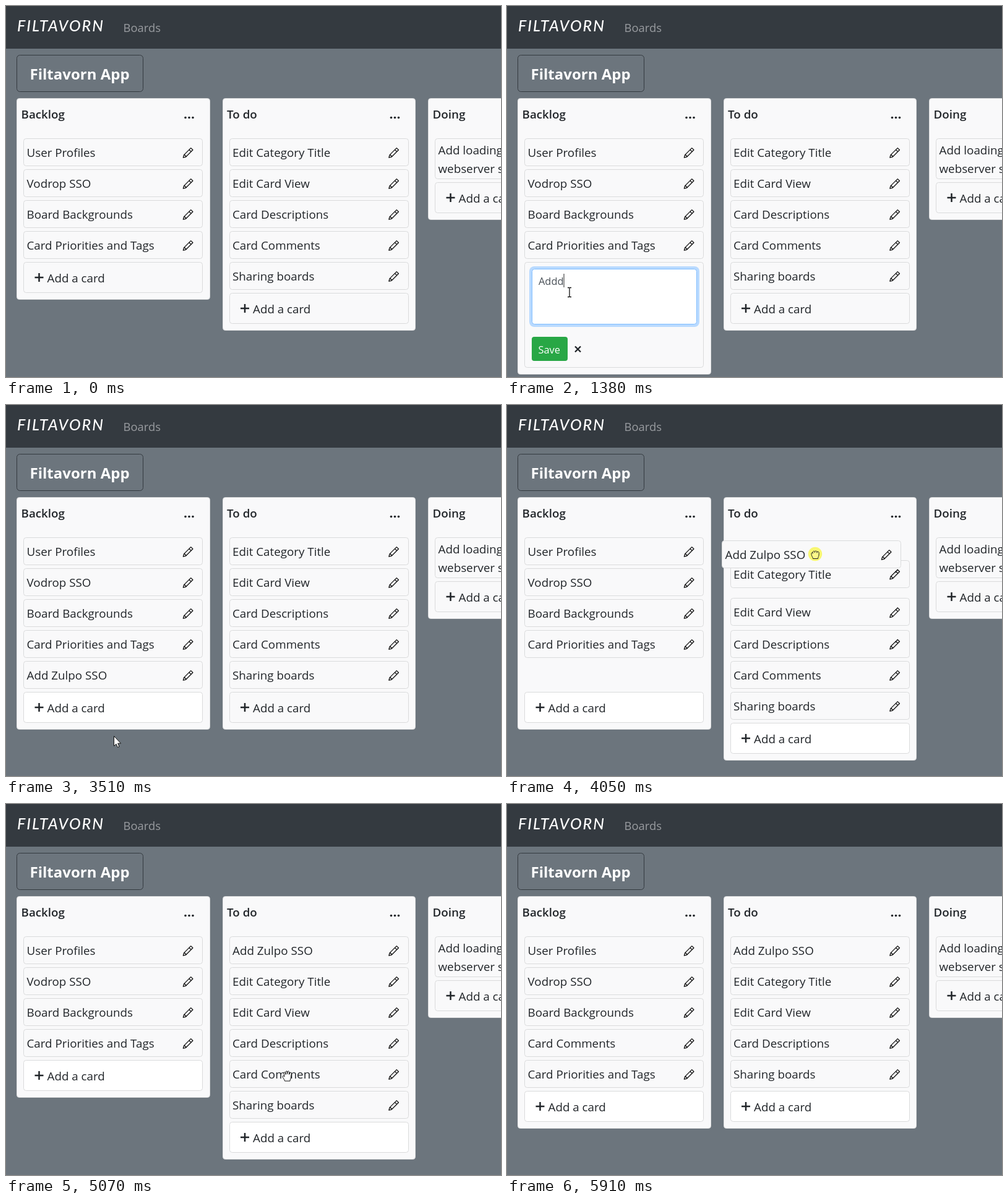
An HTML page for the animation above (6.03 s loop, 800 by 600 pixels).

```html
<!DOCTYPE html>
<html lang="en">
<head>
<meta charset="utf-8">
<title>Task board</title>
<style>
  html, body { margin: 0; width: 100%; height: 100%; overflow: hidden; background: #6c757d; }
  svg { display: block; width: 800px; height: 600px; }
  text { font-family: "Open Sans", "Noto Sans", sans-serif; font-size: 18.8px; fill: #212529; }
  .logo { font: italic 500 25px Lato, sans-serif; letter-spacing: 2px; fill: #fff; }
  .nav { font-size: 18.4px; fill: #999ca0; }
  .board { font-size: 24px; font-weight: 700; fill: #fff; }
  .title { font-weight: 600; }
  .field { font-size: 16.4px; fill: #495057; }
  .hint { fill: #6c757d; }
  .save { fill: #fff; }
</style>
</head>
<body>
<svg viewBox="0 0 800 600">
  <defs>
    <g id="pencil" fill="none" stroke="#111" stroke-width="1.1" stroke-linejoin="round">
      <path transform="translate(-9.4 -9.4) scale(1.18)" d="M12 1.3 14.7 4 5.2 13.5 1.5 14.5 2.5 10.8Z M9.6 3.7 12.3 6.4 M2.7 10.9 4 11 4.2 11.8 5 12 5.2 13.2"/>
    </g>
    <path id="plus" d="M-7 0H7M0-7V7" stroke="#212529" stroke-width="2.5"/>
    <path id="arrow" d="M.5.5V16.5L4.1 13.2 6.5 18.6 9 17.5 6.7 12.2H11.6Z" fill="#fff" stroke="#111"/>
    <g id="ibeam" fill="none">
      <path d="M-3-7.5H-1L0-7 1-7.5H3M0-7V7M-3 7.5H-1L0 7 1 7.5H3" stroke="#111" stroke-width="1.3"/>
    </g>
    <path id="hand" fill="#fff" stroke="#111" stroke-linejoin="round" d="M-4.5 8C-5 5-8 3-8 .5C-7.5-1-6-.5-5 1L-6-5C-5.5-7-4-6.5-3.6-5L-3-2.5-2.8-7C-2-8.8-.6-8.3-.5-7V-3L.4-7.5C1.2-8.8 2.6-8 2.6-6.6L2.5-2.5 4-5.5C5.3-6.6 6.6-5.5 6.2-4L5.5 2C5.2 4.5 4 5.5 4 8Z"/>
    <g id="fist" fill="#fbf98a" stroke="#222" stroke-linejoin="round">
      <path d="M-6-.5C-6.5-2.8-5-3.6-3.8-3.4C-3.8-5.8-1.6-6.3-.6-5C.4-6.4 2.4-6 2.8-4.5C4.4-5.6 6.4-4.6 6.2-2.6L6 1C5.8 3 4.6 4 4.5 6.5H-3.5C-3.6 4-6 2.4-6-.5Z"/>
      <path d="M-3.8-3.4V-1.6M-.6-5V-3M2.8-4.5V-2.6" fill="none"/>
    </g>
  </defs>
  <rect width="800" height="600" fill="#6c757d"/>
  <rect width="800" height="69" fill="#343a40"/>
  <text class="logo" x="18" y="41">FILTAVORN</text>
  <text class="nav" x="189.5" y="42">Boards</text>
  <rect x="17.5" y="79.5" width="204" height="59" rx="5" fill="none" stroke="#343a40"/>
  <text class="board" x="38.5" y="119">Filtavorn App</text>
  <g id="scene"></g>
</svg>
<script>
const LOOP = 6030, TICK = 30, ROW = 50, TOP = 214;
const COLS = [28, 360.5, 693];
const PAPER = '#f9f9fa', EDGE = '#dadbdc';
const NEW_CARD = 'Add Zulpo SSO';
const EDITOR = { open: 750, close: 3210, added: 2700 };
const scene = document.getElementById('scene');
const pen = document.createElement('canvas').getContext('2d');

const clamp = v => Math.max(0, Math.min(1, v));
const mix = (a, b, p) => a + (b - a) * p;
const within = (t, from, to) => t >= from && t < to;
const settle = p => 1 - (1 - clamp(p)) ** 3.7;
const slotY = slot => TOP + slot * ROW;
const shift = (t, start) => ROW * settle((t - start) / 200);

const PATH = [
  [210, 552, 596], [690, 101, 446], [750, 101, 446], [930, 101, 463],
  [2670, 101, 463], [2700, 99, 462], [2910, 99, 462], [3150, 114, 594], [3210, 114, 594],
  [3510, 174, 535], [3660, 179, 437], [3690, 179, 437], [3930, 462, 335],
  [4050, 498, 242], [4110, 505, 229], [4350, 505, 229], [5010, 455, 440],
  [5100, 455, 440], [5430, 123, 388], [5550, 123, 388], [5670, 268, 422], [5910, 735, 604]
];

function cursorAt(t) {
  const i = PATH.findIndex(k => k[0] > t);
  if (i < 1) return PATH[i < 0 ? PATH.length - 1 : 0].slice(1);
  const [a, b] = [PATH[i - 1], PATH[i]];
  const p = (t - a[0]) / (b[0] - a[0]);
  const eased = mix(p, p * p * (3 - 2 * p), .6);
  return [mix(a[1], b[1], eased), mix(a[2], b[2], eased)];
}

const DRAGS = {
  fresh: { grab: 3690, drop: 4260, from: [COLS[0], slotY(4)], to: [COLS[1], slotY(0)] },
  comments: { grab: 5100, drop: 5520, from: [COLS[1], slotY(4)], to: [COLS[0], slotY(3)] }
};

function dragPosition(t, { grab, drop, from, to }) {
  if (t < grab) return from;
  const start = cursorAt(grab), now = cursorAt(Math.min(t, drop));
  const p = settle((t - drop) / 240);
  return from.map((v, i) => mix(v + now[i] - start[i], to[i], p));
}

// Box edges snap to whole pixels, as in page layout.
function box(x, y, w, h, fill = PAPER, stroke = EDGE) {
  const [left, top, right, bottom] = [x, y, x + w, y + h].map(Math.round);
  return `<rect x="${left + .5}" y="${top + .5}" width="${right - left - 1}" height="${bottom - top - 1}" rx="4" fill="${fill}" stroke="${stroke}"/>`;
}
const label = (x, y, text, cls = '') => `<text class="${cls}" x="${x}" y="${y}">${text}</text>`;
const use = (id, x, y) => `<use href="#${id}" x="${x}" y="${y}"/>`;

const card = (x, y, text) =>
  box(x, y, 290, 45) + label(x + 5.5, y + 30, text) + use('pencil', x + 266, y + 23.5);

const addButton = (x, y, fill) =>
  box(x, y, 290, 50, fill) + use('plus', x + 25.5, y + 25) + label(x + 38.5, y + 33, 'Add a card');

function column(x, title, bottom) {
  const dots = [262, 268, 274].map(d => `<circle cx="${x + d}" cy="180.5" r="1.8" fill="#212529"/>`);
  return box(x - 11, 149, 312.5, bottom - 149) + label(x - 3.5, 182, title, 'title') + dots.join('');
}

function typedText(t) {
  if (t < 1080 || t >= 2490) return '';
  if (t < 1590) return 'Addd'.slice(0, [1080, 1170, 1260, 1380].filter(k => t >= k).length);
  const count = t < 2250 ? 3 + Math.floor((t - 1590) / 75) : t < 2310 ? 12 : 13;
  return NEW_CARD.slice(0, count);
}

function editor(x, y, t) {
  const text = typedText(t);
  pen.font = '16.4px "Open Sans", "Noto Sans", sans-serif';
  const caret = x + 23.5 + pen.measureText(text).width;
  return box(x, y, 290, 171) +
    `<rect x="${x + 8}" y="${y + 7}" width="275" height="98" rx="8" fill="#b9daff"/>` +
    box(x + 12, y + 11, 267, 90, '#fff', '#80bdff') +
    (text
      ? label(x + 23, y + 37, text, 'field') +
        `<path d="M${caret} ${y + 19}v22" stroke="#222"/>`
      : label(x + 23, y + 37, 'Enter card title...', 'field hint')) +
    `<rect x="${x + 12}" y="${y + 121}" width="58" height="39" rx="4" fill="#28a745"/>` +
    label(x + 22.5, y + 148, 'Save', 'field save') +
    `<path d="M${x + 82} ${y + 136.5}l9 9m0-9l-9 9" stroke="#212529" stroke-width="2.3"/>`;
}

function backlog(t) {
  const x = COLS[0];
  const slot = t < EDITOR.added ? 4 : t < 4500 ? 5 : t < 5250 ? 4 : 5;
  const y = slotY(slot), editing = within(t, EDITOR.open, EDITOR.close);
  return column(x, 'Backlog', y + (editing ? 182 : 61)) +
    ['User Profiles', 'Vodrop SSO', 'Board Backgrounds'].map((s, i) => card(x, slotY(i), s)).join('') +
    card(x, slotY(3) + shift(t, 5310), 'Card Priorities and Tags') +
    (editing ? editor(x, y, t) : addButton(x, y, t >= EDITOR.close ? '#fff' : PAPER));
}

function todo(t) {
  const x = COLS[1];
  const y = slotY(within(t, 3840, 5730) ? 6 : 5);
  return column(x, 'To do', y + 61) +
    card(x, slotY(0) + shift(t, 3990), 'Edit Category Title') +
    card(x, slotY(1) + shift(t, 3930), 'Edit Card View') +
    card(x, slotY(2) + shift(t, 3900), 'Card Descriptions') +
    card(x, slotY(4) + shift(t, 3840) - shift(t, 5160), 'Sharing boards') +
    addButton(x, y, t >= 3840 ? '#fff' : PAPER);
}

function doing() {
  const x = COLS[2];
  return column(x, 'Doing', 346) + box(x, TOP, 290, 66) +
    label(x + 5.5, 240, 'Add loading screen while') + label(x + 5.5, 270, 'webserver starts') +
    addButton(x, 285);
}

function movableCards(t) {
  const comments = t < DRAGS.comments.grab
    ? [COLS[1], slotY(3) + shift(t, 3840)]
    : dragPosition(t, DRAGS.comments);
  const fresh = t < EDITOR.added ? '' : card(...dragPosition(t, DRAGS.fresh), NEW_CARD);
  return card(...comments, 'Card Comments') + fresh;
}

function cursor(t) {
  if (!within(t, 210, 5910)) return '';
  const [x, y] = cursorAt(t);
  const dragging = Object.values(DRAGS).some(d => within(t, d.grab, d.drop));
  const pressed = dragging || within(t, 690, 750) || within(t, 3150, 3210);
  const shape = dragging ? 'fist'
    : within(t, EDITOR.open, EDITOR.added) ? 'ibeam'
    : within(t, 3600, 5520) ? 'hand' : 'arrow';
  return (pressed ? `<circle cx="${x}" cy="${y - 1}" r="11.2" fill="#f8f650" opacity=".8"/>` : '') +
    use(shape, x, y);
}

function render(t) {
  scene.innerHTML = backlog(t) + todo(t) + doing() + movableCards(t) + cursor(t);
}

const began = performance.now();
let shown = -1;
function frame() {
  const t = Math.floor(((performance.now() - began) % LOOP) / TICK) * TICK;
  if (t !== shown) render(shown = t);
  requestAnimationFrame(frame);
}
frame();
</script>
</body>
</html>
```
